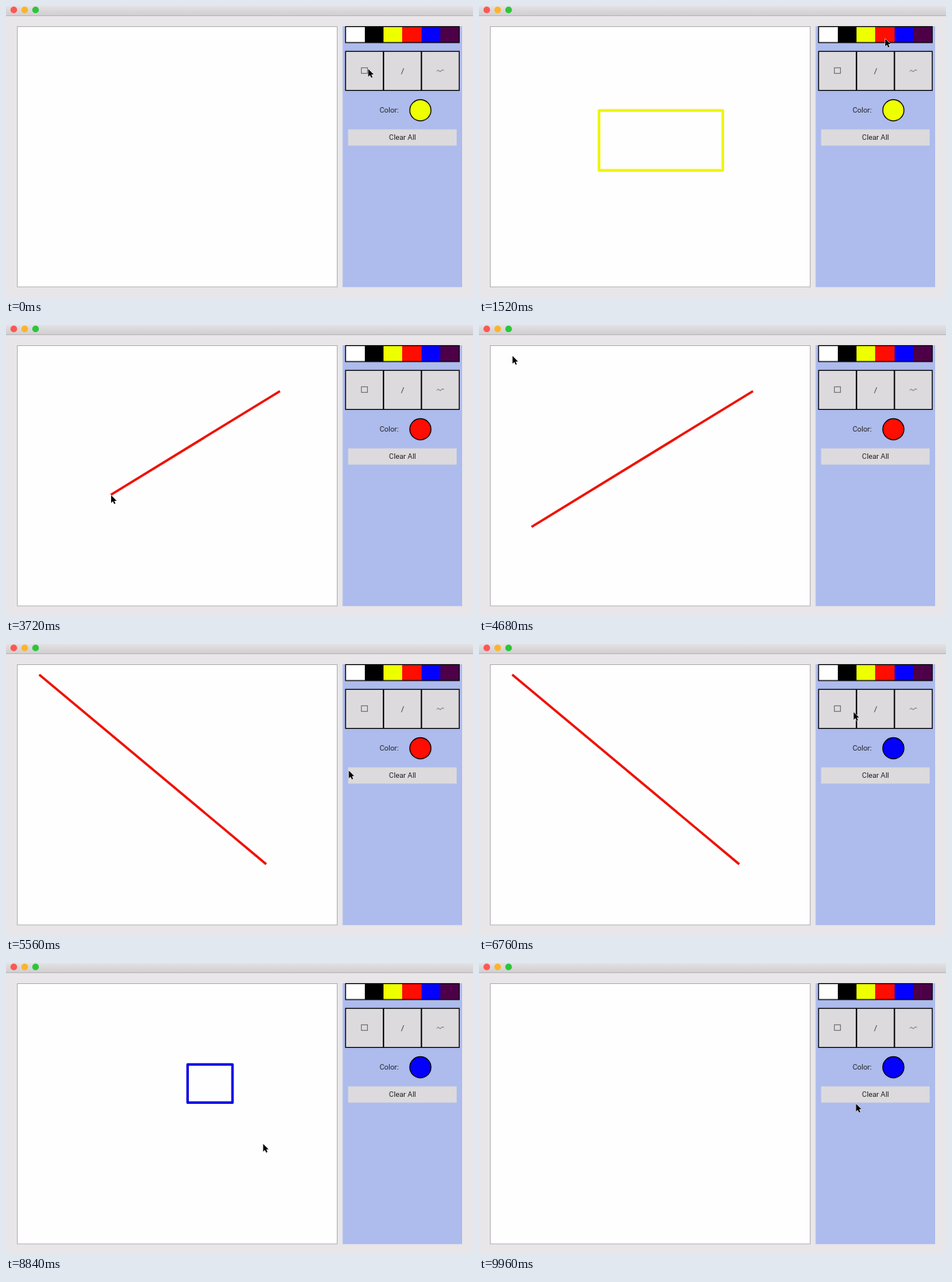
These frames come from a looping animation (600 by 374 pixels, 10000 ms). An HTML page:

```html
<!DOCTYPE html>
<html lang="en">
<head>
<meta charset="utf-8">
<title>Drawing app</title>
<style>
html, body { margin: 0; width: 100%; height: 100%; overflow: hidden; background: #e8e6e8; }
svg { display: block; width: 100vw; height: 100vh; }
text { font-family: Roboto, Inter, sans-serif; font-size: 9.4px; fill: #222; }
</style>
</head>
<body>
<svg viewBox="0 0 600 374">
  <defs>
    <linearGradient id="bar" x2="0" y2="1">
      <stop stop-color="#e3e1e3"/><stop offset="1" stop-color="#d0ced0"/>
    </linearGradient>
  </defs>
  <rect width="600" height="374" fill="#e8e6e8"/>
  <rect width="600" height="12" fill="url(#bar)"/>
  <rect y="12" width="600" height="1" fill="#bab8ba"/>
  <g id="lights"></g>
  <rect x="14.5" y="26.5" width="411" height="334.5" fill="#fffeff" stroke="#b7b5b7"/>
  <rect x="432.5" y="26" width="153.5" height="335.3" fill="#adbbed"/>
  <g id="swatches" shape-rendering="crispEdges"></g>
  <g stroke="#000" stroke-width="1.2">
    <rect x="436.3" y="26.5" width="146" height="20.5" fill="none"/>
    <rect x="436.3" y="58.3" width="146" height="50.2" fill="#dcdadc"/>
    <path d="M485 58V109M533.7 58V109" stroke-width="1.7"/>
    <circle id="chosen" cx="532.4" cy="134" r="13.6"/>
  </g>
  <g fill="none" stroke="#555" stroke-width=".8">
    <rect x="456.7" y="79.3" width="7.6" height="7.4"/>
    <path d="M508 87.6L511 80" stroke="#333"/>
    <path d="M553.5 84q1.5-2.6 3 -.6t3-.2t3-.4"/>
  </g>
  <text x="480" y="137.3">Color:</text>
  <rect x="439.5" y="158.5" width="139.5" height="21" fill="#dcdadc"/>
  <text x="509.4" y="172.3" text-anchor="middle">Clear All</text>
  <path id="shape" fill="none" stroke-linejoin="round"/>
  <path id="cursor" d="M.4 .4V10.4L2.7 8.3L4.3 11.8L5.9 11.1L4.4 7.6H7.4Z" stroke="#fff" paint-order="stroke"/>
</svg>
<script>
const LOOP = 10000, STEP = 40, REST = 80;
const YELLOW = '#eeff00', RED = '#ff0d00', BLUE = '#0400ff';
const PALETTE = ['#fff', '#000', YELLOW, RED, BLUE, '#4d0047'];
const CELL = 146 / PALETTE.length;
const $ = id => document.getElementById(id);

$('lights').innerHTML = ['#fc5753', '#fdb32b', '#2bc639']
  .map((c, i) => `<circle cx="${10 + 14 * i}" cy="5" r="4.3" fill="${c}"/>`).join('');
$('swatches').innerHTML = PALETTE
  .map((c, i) => `<rect x="${436.3 + i * CELL}" y="26.5" width="${CELL}" height="20.5" fill="${c}"/>`).join('');

const box = (a, b) => `M${a}H${b[0]}V${b[1]}H${a[0]}Z`;
const line = (a, b) => `M${a}L${b}`;

// The pointer reaches each stop at a given time, rests briefly, then moves on
const stops = [], events = [];
const last = () => stops[stops.length - 1];
const go = (at, pos) => stops.push({ at, pos });

function drag(at, pos, path, color, width) {
  const from = last();
  events.push({ at: from.at + REST, shape: { from: from.pos, path, color, width, end: at } });
  go(at, pos);
}

function pick(at, color) {
  go(at, [436.3 + CELL * (PALETTE.indexOf(color) + .5), 41.5]);
  events.push({ at: at + REST, color });
}

function clear(at, pos) {
  go(at, pos);
  events.push({ at: at + REST, shape: null });
}

events.push({ at: 0, color: YELLOW, shape: null });
go(0, [465, 80.5]);
go(400, [154.2, 134.2]);
drag(920, [313.2, 211.3], box, '#eff500', 3.4);
pick(1480, RED);
go(2120, [509, 83]);
go(3000, [336, 106]);
go(3120, [352, 85]);
drag(3960, [67.5, 259.5], line, '#ee1000', 3);
go(4640, [42.7, 39.3]);
drag(5160, [334.3, 283], line, '#ee1000', 3);
pick(5880, BLUE);
go(6760, [481, 87]);
go(7320, [233.3, 130.4]);
drag(7760, [291, 179.4], box, '#0500e4', 3.2);
go(8040, [254.5, 154.5]);
go(8760, [330, 232]);
clear(9680, [497, 168]);
go(9960, [484, 180.5]);

function pointer(t) {
  const i = stops.findIndex(s => s.at >= t);
  if (i < 1) return stops[0].pos;
  const a = stops[i - 1], b = stops[i], begin = a.at + REST;
  const k = Math.max(0, (t - begin) / (b.at - begin));
  const e = k * k * (3 - 2 * k);
  return a.pos.map((v, n) => v + (b.pos[n] - v) * e);
}

function draw(t) {
  const { color, shape } = Object.assign({}, ...events.filter(e => e.at <= t));
  $('chosen').setAttribute('fill', color);
  $('shape').setAttribute('d', shape ? shape.path(shape.from, pointer(Math.min(t, shape.end))) : '');
  if (shape) {
    $('shape').setAttribute('stroke', shape.color);
    $('shape').setAttribute('stroke-width', shape.width);
  }
  $('cursor').setAttribute('transform', `translate(${pointer(t)})`);
}

const start = performance.now();
function tick() {
  const t = (performance.now() - start) % LOOP;
  draw(Math.floor(t / STEP) * STEP);
  requestAnimationFrame(tick);
}
draw(0);
requestAnimationFrame(tick);
</script>
</body>
</html>
```
